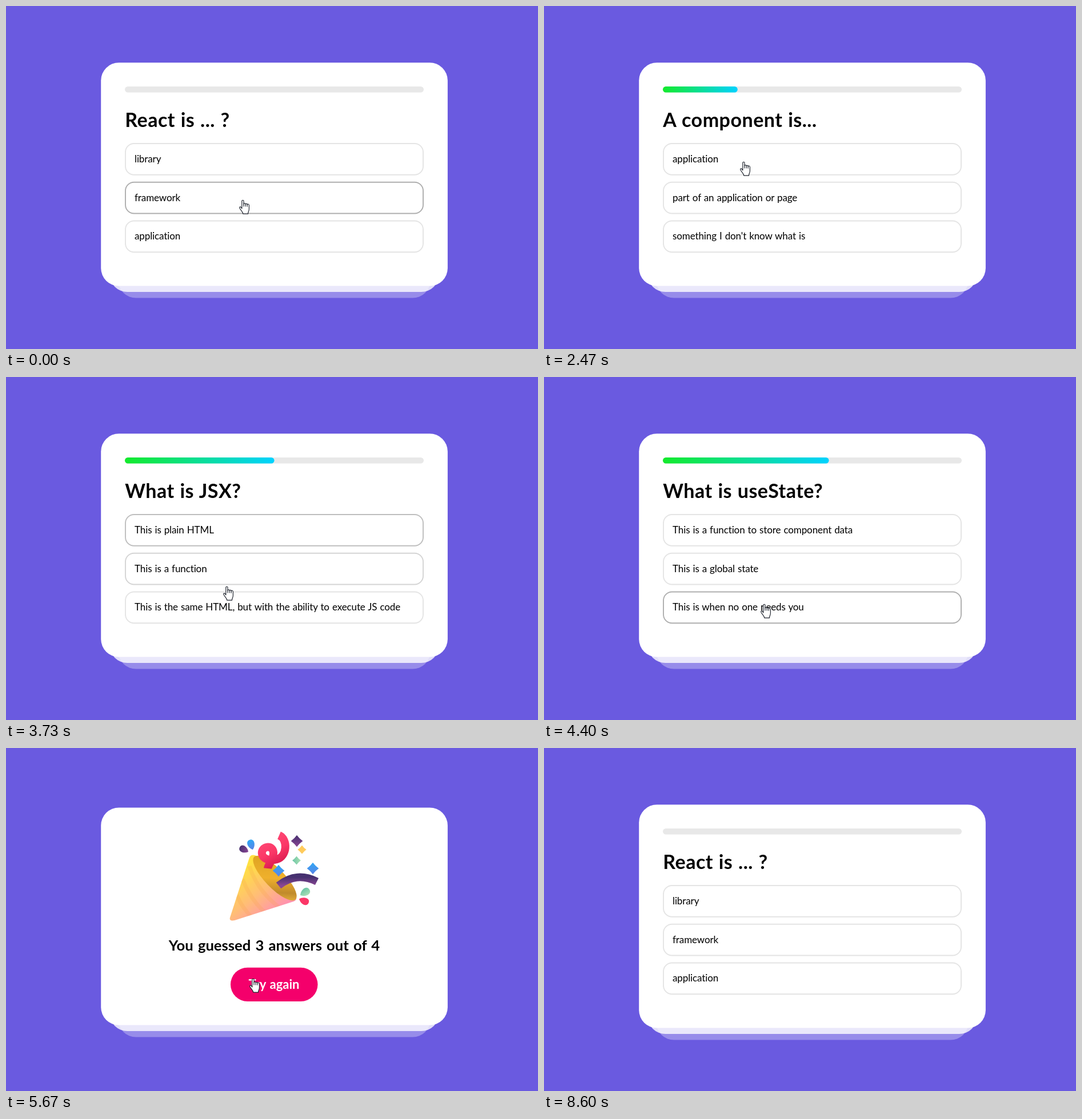
An HTML page that plays this animation: 931 px wide and 601 px high, repeating every 9.19 s.

```html
<!DOCTYPE html>
<html lang="en">
<head>
<meta charset="utf-8">
<title>Quiz</title>
<style>
  html, body { margin: 0; width: 100%; height: 100%; overflow: hidden; background: #6a5ae0; }
  svg { display: block; width: 100vw; height: 100vh; }
  text { font-family: Lato, "Open Sans", sans-serif; fill: #000; }
  .title { font-size: 34px; font-weight: 700; letter-spacing: .5px; word-spacing: 1px; }
  .answer { font-size: 17px; letter-spacing: -.11px; word-spacing: .8px; }
  .score { font-size: 25.6px; font-weight: 700; word-spacing: 2px; text-anchor: middle; }
  .again { font-size: 22px; font-weight: 700; word-spacing: 1.5px; text-anchor: middle; fill: #fff; }
  .option { fill: #fff; stroke-width: 1.9; }
  .hand { fill: #fff; stroke: #1c212b; stroke-width: 1.15; stroke-linejoin: round; stroke-linecap: round; }
</style>
</head>
<body>
<svg viewBox="0 0 931 601">
  <defs>
    <linearGradient id="fillGrad">
      <stop offset="0" stop-color="#14ea2c"/><stop offset="1" stop-color="#00d2ff"/>
    </linearGradient>
    <linearGradient id="coneGrad" gradientUnits="userSpaceOnUse" x1="415" y1="210" x2="475" y2="285">
      <stop offset="0" stop-color="#ffe140"/><stop offset=".55" stop-color="#ffbd77"/><stop offset="1" stop-color="#ff93ae"/>
    </linearGradient>
    <linearGradient id="mouthGrad" gradientUnits="userSpaceOnUse" x1="435" y1="192" x2="505" y2="265">
      <stop offset="0" stop-color="#d9a01f"/><stop offset=".5" stop-color="#efb02c"/>
      <stop offset=".75" stop-color="#c08a2c"/><stop offset="1" stop-color="#ffc843"/>
    </linearGradient>
    <linearGradient id="redGrad" x2=".4" y2="1">
      <stop offset="0" stop-color="#ff4d78"/><stop offset=".6" stop-color="#fb3767"/><stop offset="1" stop-color="#dc1c50"/>
    </linearGradient>
    <linearGradient id="plumGrad" x2="0" y2="1">
      <stop offset="0" stop-color="#46306f"/><stop offset="1" stop-color="#8a4794"/>
    </linearGradient>
    <linearGradient id="blueGrad" x2="0" y2="1">
      <stop offset="0" stop-color="#2fa8f5"/><stop offset="1" stop-color="#5a83e6"/>
    </linearGradient>
    <linearGradient id="mintGrad">
      <stop offset="0" stop-color="#6cc5a6"/><stop offset="1" stop-color="#a9e0b4"/>
    </linearGradient>
    <clipPath id="coneClip"><use href="#cone"/></clipPath>
    <path id="cone" d="M392 297 L426 192 Q429 185 438 189 L508 262 Q509 267 503 269 L400 302 Q390 304 392 297Z"/>
    <path id="star" d="M0 -10 Q4.2 -4.2 10 0 Q4.2 4.2 0 10 Q-4.2 4.2 -10 0 Q-4.2 -4.2 0 -10Z"/>
    <path id="drop" d="M0 0 C-8 -6 -8.5 -18 0 -18 C8.5 -18 8 -6 0 0Z"/>
  </defs>

  <g id="quiz">
    <g class="card" data-top="99.2" data-bottom="490.6"></g>
    <rect x="208" y="141" width="523" height="10.4" rx="5.2" fill="#e8e8e8"/>
    <rect id="bar" x="208" y="141" width="0" height="10.4" rx="5.2" fill="url(#fillGrad)"/>
    <text id="title" class="title" x="208.3" y="212"></text>
    <g id="options"></g>
  </g>

  <g id="result">
    <g class="card" data-top="104.4" data-bottom="485.6"></g>
    <use href="#cone" fill="url(#coneGrad)"/>
    <g clip-path="url(#coneClip)" fill="none" stroke="#f5a04c" stroke-opacity=".22" stroke-width="7">
      <path d="M426 207 Q440 252 482 282M414 230 Q428 266 455 290M404 258 Q414 282 432 298"/>
    </g>
    <ellipse cx="470.5" cy="228" rx="52" ry="17" transform="rotate(46 470.5 228)" fill="url(#mouthGrad)"/>
    <path d="M478 153 C494 160 492 190 474 195 C455 200 444 189 449 179 C454 170 468 172 468 184 C468 196 459 203 458 211"
          fill="none" stroke="url(#redGrad)" stroke-width="14"/>
    <path d="M477 241 Q508 216 544 234" fill="none" stroke="url(#plumGrad)" stroke-width="13.5"/>
    <g id="confetti"></g>
    <text class="score" x="469.5" y="355">You guessed 3 answers out of 4</text>
    <rect x="393" y="384.7" width="152.5" height="59.3" rx="29.6" fill="#f4006b"/>
    <text class="again" x="469" y="421.5">Try again</text>
  </g>

  <g id="cursor" class="hand">
    <path d="M4.8 15.2 V2.4 C4.8 .1 8 .1 8 2.4 V7.2 C8.2 5.7 11 5.7 11.2 7.4 C11.6 6.2 14 6.5 14.2 8.2 C14.8 7.2 17.4 7.4 17.4 9.8 V16 C17.4 20 15.6 20.6 15.4 24.5 H6.8 C6.6 21.2 3.6 19.4 .9 14.6 C0 12.4 2.2 11.5 3.4 13.2Z"/>
    <path d="M8 7.2 V11.4 M11.2 7.4 V11.4 M14.2 8.2 V11.6" fill="none"/>
  </g>
</svg>

<script>
const LOOP = 9190, TICK = 200 / 3, BAR_TICKS = 6, BAR_STEP = 523 / 4;
const RESULT_FROM = 84, RESULT_TO = 119;
const $ = id => document.getElementById(id);

const questions = [
  { from: 0, title: "React is ... ?", answers: ["library", "framework", "application"] },
  { from: 19, title: "A component is...",
    answers: ["application", "part of an application or page", "something I don't know what is"] },
  { from: 45, title: "What is JSX?",
    answers: ["This is plain HTML", "This is a function", "This is the same HTML, but with the ability to execute JS code"] },
  { from: 64, title: "What is useState?",
    answers: ["This is a function to store component data", "This is a global state", "This is when no one needs you"] }
];

// Pointer path: tick, left, top
const path = [
  [0, 408, 340], [1, 362, 285], [3, 306, 240], [5, 306, 240], [8, 310, 250], [9, 310, 250],
  [13, 304, 259], [27, 304, 259], [31, 345, 341], [35, 330, 229], [36, 330, 229],
  [37, 343, 273], [38, 356, 315], [39, 362, 336], [50, 362, 336], [53, 370, 236],
  [54, 375, 282], [55, 378, 328], [56, 380, 367], [58, 379, 392], [60, 379, 398],
  [69, 379, 398], [73, 410, 431], [77, 434, 409], [78, 426, 404], [89, 426, 404],
  [92, 442, 350], [94, 482, 319], [97, 537, 372], [99, 519, 437], [101, 479, 427],
  [102, 479, 427], [106, 477, 425], [126, 477, 425], [127, 270, 515], [128, 84, 576], [129, 0, 640]
];

for (const g of document.querySelectorAll(".card")) {
  const top = +g.dataset.top, bottom = +g.dataset.bottom;
  const layer = (inset, drop, alpha) =>
    `<rect x="${166.2 + inset}" y="${top + drop}" width="${606.7 - 2 * inset}" height="${bottom - top}" rx="31.4" fill="#fff" fill-opacity="${alpha}"/>`;
  g.innerHTML = layer(30, 21, .3) + layer(15, 10.5, .8) + layer(0, 0, 1);
}

$("options").innerHTML = [0, 1, 2].map(i => {
  const y = 67.75 * i;
  return `<rect class="option" x="209" y="${241 + y}" width="521" height="54.8" rx="15"/>
    <text class="answer" x="225" y="${273.8 + y}"></text>`;
}).join("");

const star = (x, y, r, fill) =>
  `<use href="#star" fill="${fill}" transform="translate(${x} ${y}) scale(${r / 10})"/>`;
const drop = (x, y, turn, size, fill) =>
  `<use href="#drop" fill="${fill}" transform="translate(${x} ${y}) rotate(${turn}) scale(${size})"/>`;
$("confetti").innerHTML =
  star(509, 163, 10.3, "url(#plumGrad)") + star(518, 178, 7.6, "#ffcb5c") +
  star(508.5, 197, 7.5, "url(#mintGrad)") + star(537, 211, 10.3, "url(#blueGrad)") +
  star(477, 215, 10.3, "url(#blueGrad)") +
  drop(424, 182, -61, .95, "url(#plumGrad)") + drop(432, 178, -18, 1, "url(#blueGrad)") +
  drop(515, 258, 58, 1.05, "url(#mintGrad)") + drop(513, 264.5, 112, 1, "#fb3767");

const rects = [...document.querySelectorAll(".option")];
const labels = [...document.querySelectorAll(".answer")];

function pointer(k) {
  const i = path.findIndex(p => p[0] >= k);
  if (i < 0) return path[path.length - 1].slice(1);
  if (i === 0) return path[0].slice(1);
  const [a, b] = [path[i - 1], path[i]], f = (k - a[0]) / (b[0] - a[0]);
  return [1, 2].map(n => a[n] + (b[n] - a[n]) * f);
}

function over(box, k) {
  const y = pointer(Math.max(k, 0))[1] - 240 - 67.75 * box;
  return y >= 0 && y <= 56.5 ? 1 : 0;
}

// The border colour follows the pointer with a short delay
const hover = (box, k) => .3 * over(box, k - 1) + .7 * over(box, k - 2);
const ease = p => p < .5 ? 2 * p * p : 1 - 2 * (1 - p) * (1 - p);

function draw(k) {
  const done = k >= RESULT_FROM && k < RESULT_TO;
  $("quiz").style.display = done ? "none" : "";
  $("result").style.display = done ? "" : "none";

  const n = k >= RESULT_TO ? 0 : questions.filter(q => q.from <= k).length - 1;
  const q = questions[n];
  const grown = n ? n - 1 + ease(Math.min((k - q.from) / BAR_TICKS, 1)) : 0;
  $("bar").setAttribute("width", grown * BAR_STEP);
  $("title").textContent = q.title;
  labels.forEach((label, i) => label.textContent = q.answers[i]);
  rects.forEach((rect, i) => {
    const c = Math.round(228 - 54 * hover(i, k));
    rect.setAttribute("stroke", `rgb(${c},${c},${c})`);
  });

  const [x, y] = pointer(k);
  $("cursor").setAttribute("transform", `translate(${x} ${y - .4})`);
}

function frame() {
  draw(Math.floor((performance.now() % LOOP + 4) / TICK));
  requestAnimationFrame(frame);
}
frame();
</script>
</body>
</html>
```
